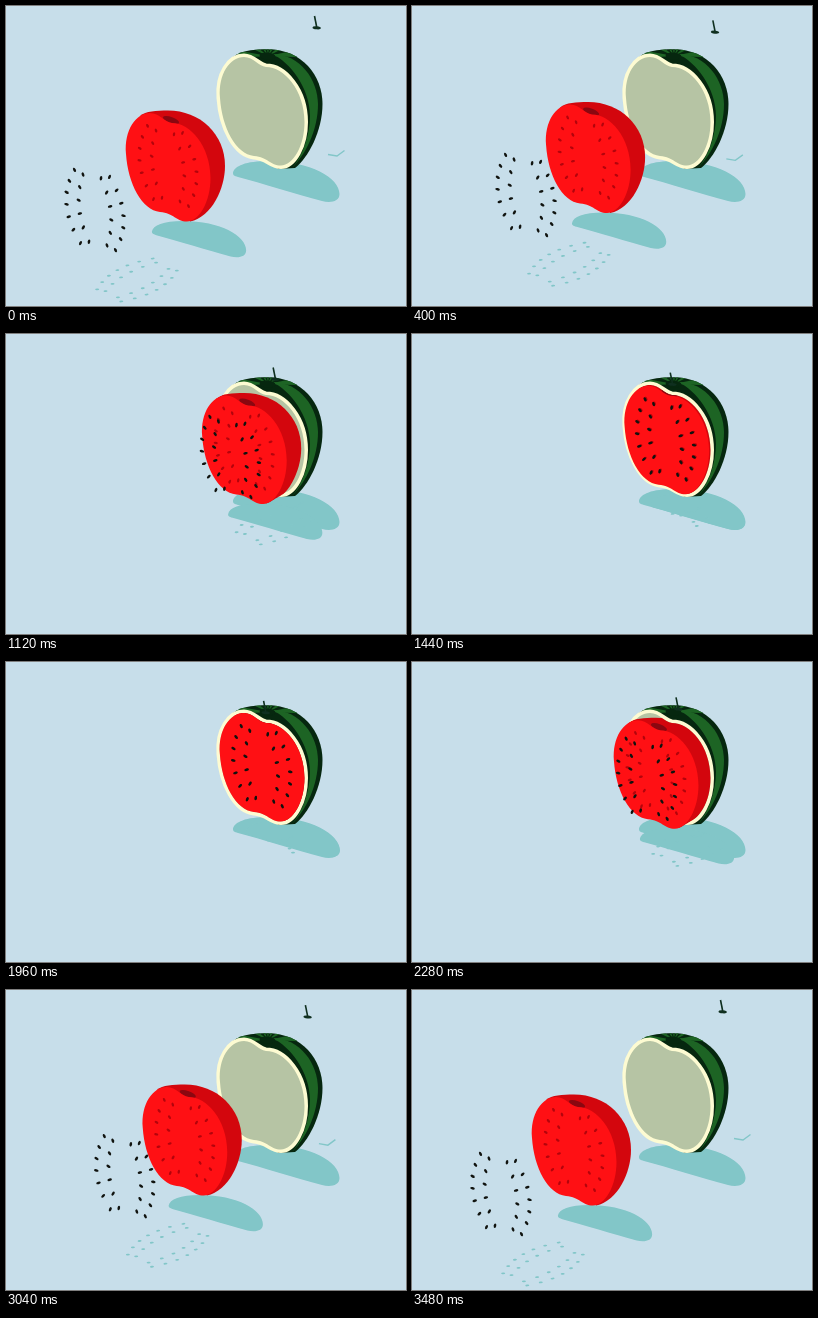
An HTML page with a canvas for the animation above (3.65 s loop, 400x300 px).

```html
<!DOCTYPE html>
<html lang="en">
<head>
<meta charset="utf-8">
<title>Watermelon</title>
<style>
html, body { margin: 0; width: 100%; height: 100%; overflow: hidden; background: #c7deea; }
canvas { display: block; width: 400px; height: 300px; }
</style>
</head>
<body>
<canvas id="stage" width="400" height="300"></canvas>
<script>
const ctx = document.getElementById('stage').getContext('2d');

const C = {
  bg: '#c7deea', shadow: '#82c6c8', red: '#ff1014', deepRed: '#d3060d',
  crease: '#8a0710', hole: '#b3040c', inner: '#b6c4a4', cream: '#fdfbd2',
  dark: '#06270f', green: '#1d6424', seed: '#10130f', stem: '#0f2f1f'
};

const LOOP = 3650, STEP = 40, TRAVEL = 1560, BACK = 1920;

// Every part is described at its assembled place, inside the rind.
const face = new Path2D(`M214 92 C212 68 224 51 238 51 C248 51 252 60 260 61
  C278 61 298.5 84 298.5 116 C298.5 140 287 159.5 275 159.5
  C264 159.5 262 151 248 150 C230 148 216 122 214 92 Z`);
const shell = new Path2D(`M224 54 C232 45 245 43.3 262 43.3
  C296 43.3 316.5 70 316.5 98 C316.5 125 302 152 289 162 L272 163 Z`);
const stripe = new Path2D(`M266 48 C295 48 312 75 312 98 C312 124 300 148 286 162
  C297 150 304 128 304 110 C304 82 284 56 266 48 Z`);
const fleshBack = new Path2D(`M228 54 C234 49 244 48.5 256 48.5
  C288 48.5 313 72 313 104 C313 126 300 155 278 159.5 Z`);
const halfShadow = new Path2D(`M227 167 C228 160 240 155 262 155
  C305 155 333.5 172 333.5 188 C333.5 196 324 197 316 195
  C290 188 255 177 232 171 C228 170 227 169 227 167 Z`);

// Two bowed columns of seeds on each side of the heart.
const seeds = [];
for (const side of [-1, 1]) {
  for (const [count, wide, bow, tall] of [[7, 28.5, 11, 36], [6, 16, 7, 33]]) {
    for (let i = 0; i < count; i++) {
      const v = 2 * i / (count - 1) - 1;
      const dx = side * (wide - bow * v * v) + 3 * v;
      seeds.push({ dx, dy: tall * v + 0.2 * dx });
    }
  }
}

function fill(path, color) {
  ctx.fillStyle = color;
  ctx.fill(path);
}

function oval(x, y, rx, ry, turn, color) {
  ctx.fillStyle = color;
  ctx.beginPath();
  ctx.ellipse(x, y, rx, ry, turn, 0, Math.PI * 2);
  ctx.fill();
}

function line(d, color, width) {
  ctx.strokeStyle = color;
  ctx.lineWidth = width;
  ctx.stroke(new Path2D(d));
}

function shifted(x, y, draw) {
  ctx.save();
  ctx.translate(x, y);
  draw();
  ctx.restore();
}

function drawSeeds(size, color) {
  for (const { dx, dy } of seeds) {
    oval(256 + dx, 104 + dy, 2.3 * size, 1.3 * size, Math.atan2(dy, dx), color);
  }
}

function drawShadows(apart) {
  fill(halfShadow, C.shadow);
  shifted(39 - 94 * apart, 21.8 + 56 * apart, () => {
    ctx.scale(0.885, 0.885);
    fill(halfShadow, C.shadow);
  });
  shifted(51 * apart, -29 * apart, () => {
    line('M271 177.5 L280 179 L287.5 173.5', C.shadow, 1.4);
  });
  // Seed shadows merge with the big one above this line.
  ctx.save();
  ctx.clip(new Path2D('M0 118 L400 206 V300 H0 Z'));
  ctx.translate(303 - 172 * apart, 169 + 105 * apart);
  for (const { dx, dy } of seeds) {
    const u = dx / 58, h = (0.2 * dx - dy) / 70;
    oval(40 * u + 58 * h, 20 * u - 28 * h, 2, 0.9, -0.1, C.shadow);
  }
  ctx.restore();
}

function drawShell() {
  fill(shell, C.dark);
  fill(stripe, C.green);
  ctx.save();
  ctx.clip(shell);
  ctx.fillStyle = C.green;
  for (let a = 3.2; a < 6.3; a += 0.5) {
    ctx.beginPath();
    ctx.moveTo(262, 50);
    ctx.arc(262, 50, 32, a - 0.12, a + 0.12);
    ctx.fill();
  }
  ctx.restore();
  ctx.strokeStyle = C.cream;
  ctx.lineWidth = 7;
  ctx.stroke(face);
  oval(261.5, 50, 8, 3.5, 0.1, C.dark);
  fill(face, C.inner);
}

function drawFlesh(apart) {
  const dx = 94 * apart, dy = -56 * apart;
  shifted(-dx, -dy, () => {
    ctx.save();
    // What has passed the rim can no longer be seen outside the opening.
    if (dx < 20) {
      const sweep = new Path2D();
      for (let i = 0; i <= 24; i++) {
        sweep.addPath(face, new DOMMatrix([1, 0, 0, 1, dx * i / 24, dy * i / 24]));
      }
      ctx.clip(sweep);
    }
    fill(fleshBack, C.deepRed);
    oval(259, 58, 8.5, 3, 0.35, C.crease);
    ctx.restore();
    fill(face, C.red);
    drawSeeds(0.9, C.hole);
  });
}

function drawStem() {
  line('M257.5 39 L259.7 50', C.stem, 1.6);
  oval(259.7, 50.8, 4.2, 1.5, 0.1, C.stem);
}

function ease(t) {
  return 0.5 - 0.5 * Math.cos(Math.PI * t) - 0.025 * Math.sin(Math.PI * t) ** 6;
}

function joined(ms) {
  if (ms < TRAVEL) return ease(ms / TRAVEL);
  if (ms < BACK) return 1;
  return ease(Math.max(0, 1 - (ms - BACK) / TRAVEL));
}

function frame() {
  const ms = Math.floor(performance.now() % LOOP / STEP) * STEP;
  const apart = 1 - joined(ms);
  ctx.fillStyle = C.bg;
  ctx.fillRect(0, 0, 400, 300);
  drawShadows(apart);
  drawShell();
  shifted(51 * apart, -29 * apart, drawStem);
  drawFlesh(apart);
  shifted(-167 * apart, 100 * apart, () => drawSeeds(1, C.seed));
  requestAnimationFrame(frame);
}
frame();
</script>
</body>
</html>
```
